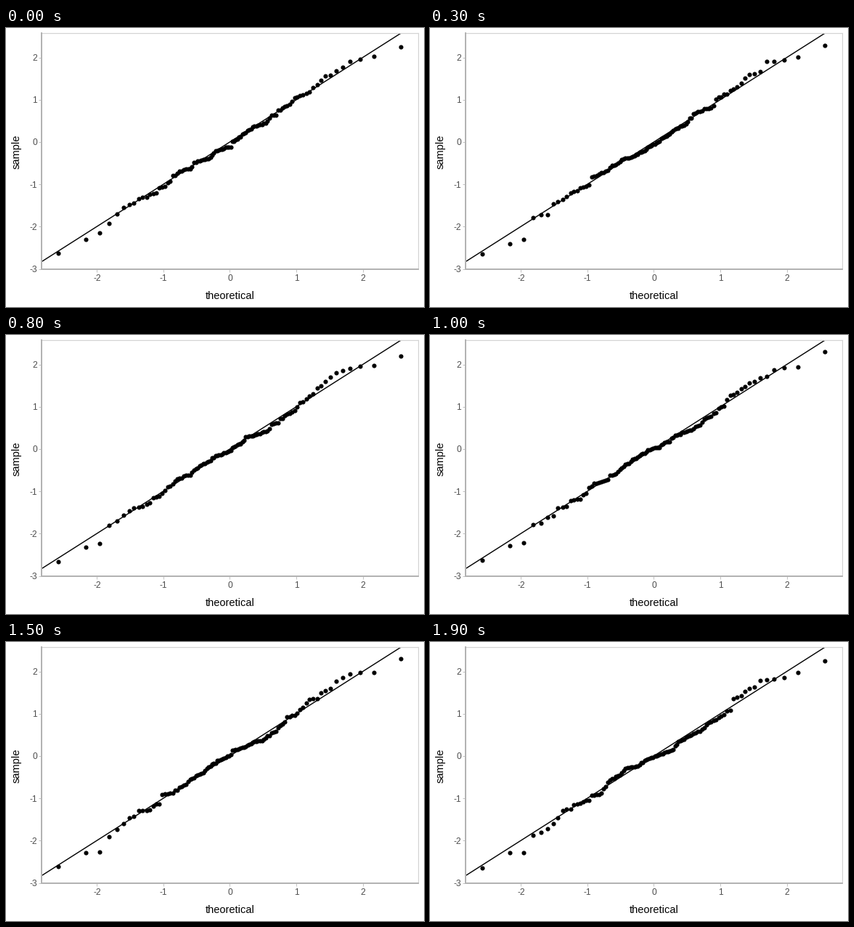
Recreate the animation shown at these times as a matplotlib script. Size 576 by 384 pixels, loop 2 s.

```python
import math

import matplotlib.pyplot as plt
import numpy as np
from matplotlib.animation import FuncAnimation

W, H, DPI = 576, 384, 96
FRAMES, STEP_MS = 20, 100
N = 100
LEFT, RIGHT, TOP, BOTTOM = 49.2, 567.9, 7.4, 332.4
X_SCALE, Y_SCALE = 91.64, 58.2
X_ZERO, Y_ZERO = 308.4, 156.9
GREY, PALE = "#b3b3b3", "#d3d3d3"

plt.rcParams["font.family"] = ["Liberation Sans", "DejaVu Sans"]


def normal_quantiles(n):
    grid = np.linspace(-4, 4, 4001)
    cdf = [0.5 * (1 + math.erf(g / math.sqrt(2))) for g in grid]
    return np.interp((np.arange(n) + 0.5) / n, cdf, grid)


z = normal_quantiles(N)

# Typical ordered sample: a few (rank, value) points joined along z.
ranks, values = zip((0, -2.66), (1, -2.34), (2, -2.23), (3, -1.85), (5, -1.65),
                    (6, -1.48), (14, -1.04), (20, -0.78), (34, -0.32), (50, 0.04),
                    (60, 0.19), (72, 0.51), (85, 1.06), (93, 1.65), (96, 1.91),
                    (98, 1.97), (99, 2.25))
base = np.interp(z, z[list(ranks)], values)
spread = 0.05 + 0.23 * np.exp(-z ** 2 / 2)


def sample(i):
    """Jitter the typical sample, widest in the middle, and sort it again."""
    rng = np.random.default_rng(40 + i)
    return np.sort(base + spread * rng.uniform(-1, 1, N))


fig = plt.figure(figsize=(W / DPI, H / DPI), dpi=DPI, facecolor="white")
ax = fig.add_axes([LEFT / W, 1 - BOTTOM / H, (RIGHT - LEFT) / W, (BOTTOM - TOP) / H])
ax.set_xlim((LEFT - X_ZERO) / X_SCALE, (RIGHT - X_ZERO) / X_SCALE)
ax.set_ylim((Y_ZERO - BOTTOM) / Y_SCALE, (Y_ZERO - TOP) / Y_SCALE)


def label(x, y, text, points, color, **kw):
    fig.text(x / W, 1 - y / H, text, fontsize=points, color=color, **kw)


x_ticks, y_ticks = range(-2, 3), range(-3, 3)
ax.set_xticks(x_ticks, [""] * len(x_ticks))
ax.set_yticks(y_ticks, [""] * len(y_ticks))
ax.tick_params(length=2.75, width=0.6, color=GREY)
for v in x_ticks:
    label(X_ZERO + 0.4 + v * X_SCALE, 348, str(v), 9, "#4d4d4d", ha="center")
for v in y_ticks:
    label(43, Y_ZERO - v * Y_SCALE + 4.5, str(v), 9, "#4d4d4d", ha="right")
label(X_ZERO + 0.4, 373, "theoretical", 11, "black", ha="center")
label(19, 170, "sample", 11, "black", ha="center", va="baseline",
      rotation=90, rotation_mode="anchor")

for side in ("top", "right"):
    ax.spines[side].set(color=PALE, linewidth=0.9, zorder=5)
for side in ("left", "bottom"):
    ax.spines[side].set(color=GREY, linewidth=1.5, zorder=6)

dots, = ax.plot(z, sample(0), "o", color="black", markersize=4.6, markeredgewidth=0, zorder=3)
ax.plot([-3, 3], [-3, 3], color="black", linewidth=1.07, zorder=4)


def draw(i):
    dots.set_ydata(sample(i))
    return dots,


anim = FuncAnimation(fig, draw, frames=FRAMES, init_func=lambda: draw(0),
                     interval=STEP_MS, repeat=True, repeat_delay=0)
plt.show()
```
